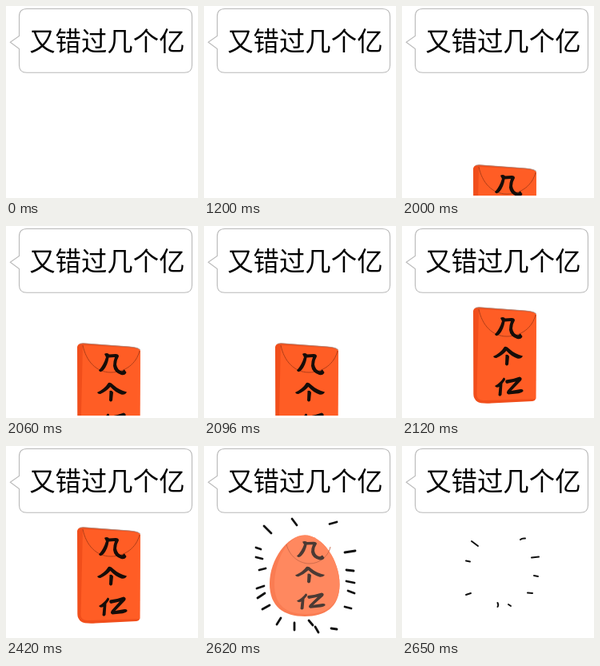
An HTML page for the animation above (2680 ms loop, 240 px wide and 240 px high).

```html
<!DOCTYPE html>
<html lang="zh-CN">
<head>
<meta charset="utf-8">
<title>又错过几个亿</title>
<style>
html, body { margin: 0; width: 100%; height: 100%; overflow: hidden; background: #fff; }
svg { display: block; width: 100%; height: 100%; }
text { font: 400 32.4px "Noto Sans CJK SC", "Noto Sans CJK", sans-serif; fill: #000; }
.ticks { fill: none; stroke: #111; stroke-width: 2; stroke-linecap: round; }
.bold { stroke-width: 2.8; }
</style>
</head>
<body>
<svg viewBox="0 0 240 240">
  <defs>
    <clipPath id="floor"><rect width="240" height="237"/></clipPath>
    <!-- brush lettering 几 个 亿 -->
    <g id="brush">
      <path d="M123 115 Q126 113 129 115.5 L137 115 Q141 115 141 118 Q138 123 138 128 Q139 135 145 136.5 L148 134.5 L150.5 138 Q149 142 144 141 Q135 138 134 130 Q134 124 136 119 L128.5 119.5 Q127 129 122 135 Q118 139 116 135.5 Q122 129 125 119 Z"/>
      <path d="M128 151 Q131 150 134 153.5 Q141 160 151 162.5 Q149 166.5 144 165.5 Q136 162.5 130.5 156 Q125 162 118 165 Q115 165.5 114 163 Q123 159 128 151 Z M129.5 161 Q132.5 160 134 163 L133 173 Q131 176 129 173 Z"/>
      <path d="M127 189.5 Q130 190 128.5 193 L125.5 197 L124.5 211 Q122.5 214 120.5 211.5 L121.5 201 Q118 203 116 200 Q123 196 127 189.5 Z M130 192.5 Q138 192 147 188.5 Q151 189.5 149 193 L136.5 206 L148 204 Q152 203.5 151.5 206.5 Q149 209 143 209.5 L133 210.5 Q129.5 209 132 205.5 L142 194.5 L131 197 Q128 195 130 192.5 Z"/>
    </g>
  </defs>

  <path d="M26 3.5 H223 Q232.5 3.5 232.5 13 V74 Q232.5 83.3 223 83.3 H26 Q16.5 83.3 16.5 74 V53.5 L5.3 45.2 L16.5 37.5 V13 Q16.5 3.5 26 3.5 Z" fill="#fff" stroke="#b9b9b9" stroke-width="1.1"/>
  <text x="29.2" y="55.7">又错过几个亿</text>

  <g clip-path="url(#floor)">
    <g id="packet">
      <path d="M93 102 Q96 101 100 101.8 L154 105.8 Q167.5 107 167.8 111 L167.3 215 Q167 218.5 163 219 L112 221.5 Q98 222.3 94 219.5 Q89.3 216 89.3 210 L89 106 Q90 102.5 93 102 Z" fill="#f14e1b"/>
      <path d="M96 104 L154 107 Q167 108 167.8 111 L167.3 216 L102 218 Q93.5 218 93.5 211 Z" fill="#ff5d25"/>
      <path d="M92 102.3 Q96 101.3 100 102 L154 106 Q167 107 167.7 110" fill="none" stroke="#a58b80" stroke-width=".8"/>
      <path d="M96 104 C100 124 113 138 131 138 C149 138 163 127 167 111" fill="none" stroke="#a93c18" stroke-width=".9"/>
      <use href="#brush" fill="#160d09"/>
    </g>
  </g>

  <g id="egg">
    <path d="M126 111.5 C148 111.5 169.5 143 169.5 173 C169.5 202 151 213 126 213 C100 213 82 201 82 172 C82 142 104 111.5 126 111.5 Z" fill="#fa7c52"/>
    <path d="M126 111.5 C148 111.5 169.5 143 169.5 173 C169.5 199 152 210 128 210 C102 210 88 199 88 173 C88 145 104 111.5 126 111.5 Z" fill="#ff885f"/>
    <path d="M103 123 C107 138 119 147 132 147 C145 147 156 137 158 126" fill="none" stroke="#c9694a" stroke-width=".9"/>
    <use href="#brush" fill="#4b3a34" transform="translate(0 19.6) scale(1 .87)"/>
    <path class="ticks bold" d="M75 100 L84 109 M110 91 L116 99 M157 97.5 L166 95 M65 127 L71 129 M176 133 L189 131 M65 139 L73 141 M178 155 L187 156 M69 155 L77 153 M178 169 L188 171 M66 178 L75 175 M180 181 L188 184 M67 190 L76 184 M73 204 L82 199 M176 201 L184 203 M91 223 L96 215 M113 221 L113 230 M131 218 L136 224 M139 226 L143 233 M159 228 L166 229"/>
  </g>

  <path id="sparks" class="ticks" d="M87 119 L95 125 M148 117 Q150 115 154 115.5 M162 139.5 L171 138.5 M80 143.5 L85 144.5 M165 162 L170 163 M80 186 L86 184 M157 183.5 L163 184 M119.5 196 Q121 199 119.5 201 M133 198 L136 200"/>
</svg>
<script>
const LOOP = 2680;
const [packet, egg, sparks] = ["packet", "egg", "sparks"].map(id => document.getElementById(id));
const show = (el, on) => el.setAttribute("visibility", on ? "visible" : "hidden");

function draw(t) {
  const drop = t < 2060 ? 97 : t < 2120 ? 45 : 0;
  packet.setAttribute("transform", `translate(0 ${drop})`);
  show(packet, t >= 2000 && t < 2620);
  show(egg, t >= 2620 && t < 2650);
  show(sparks, t >= 2650);
}

const start = performance.now();
function tick() {
  draw((performance.now() - start) % LOOP);
  requestAnimationFrame(tick);
}
draw(0);
requestAnimationFrame(tick);
</script>
</body>
</html>
```
